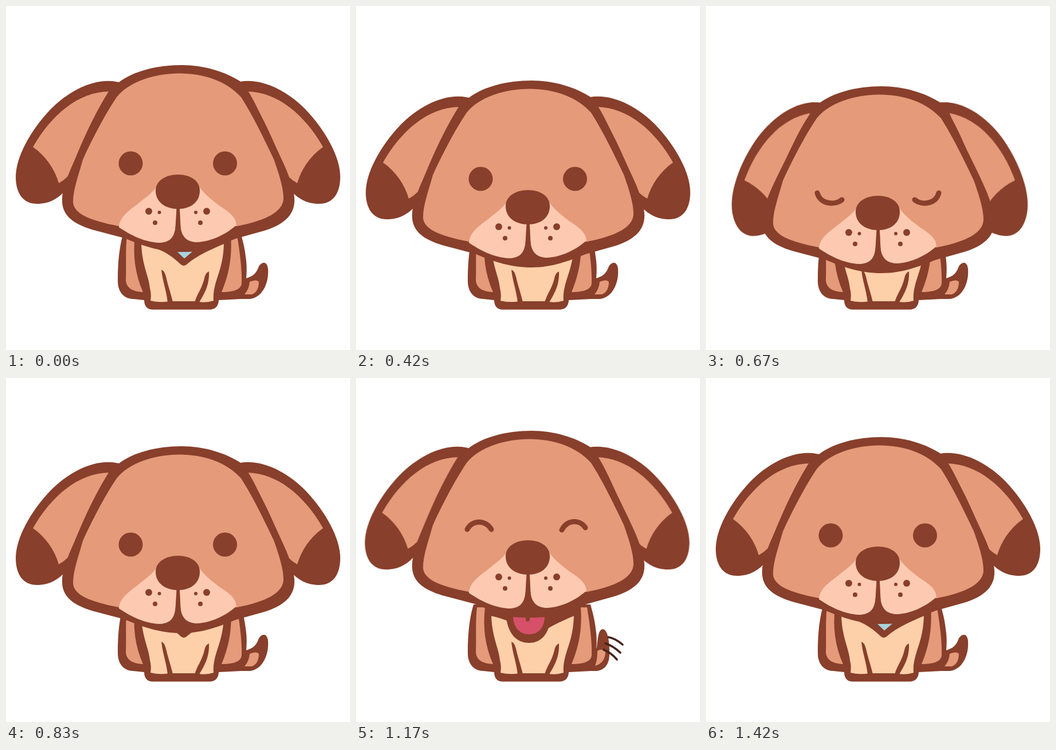
An HTML page that plays this animation: 600 px wide and 600 px high, repeating every 1.5 s.

```html
<!DOCTYPE html>
<html lang="en">
<head>
<meta charset="utf-8">
<title>Nodding puppy</title>
<style>
  html, body { margin: 0; width: 100%; height: 100%; overflow: hidden; background: #fff; }
  svg { display: block; width: 100vw; height: 100vh; }

  .dark { fill: #883f2b; }
  .fur { fill: #e59a79; }
  .belly { fill: #fdd0a9; }
  .muzzle { fill: #fdcab1; }
  .line { fill: none; stroke: #883f2b; stroke-width: 9; stroke-linecap: round; }
  .whisk { fill: none; stroke: #47231a; stroke-width: 3.6; stroke-linecap: round; }

  .head, .ear, .awake, .asleep, .joy, .rest, .wag { animation: 1500ms step-end infinite; }
  .head { animation-name: nod; }
  .ear { animation-name: tuck; transform-origin: 185px 135px; }
  .left { --in: 0px; --sway: -1.5px; }
  .right { --in: -6px; --sway: 1.5px; }
  .awake { animation-name: awake; }
  .asleep { animation-name: asleep; }
  .joy { animation-name: joy; }
  .rest { animation-name: rest; }
  .wag { animation-name: wag; }

  @keyframes nod {
    0% { transform: none; }
    22% { transform: translateY(11px); }
    28% { transform: translateY(27px); }
    33.33% { transform: translateY(34px); }
    38.66% { transform: translateY(37px); }
    50% { transform: translateY(30px); }
    55.33% { transform: translateY(16px); }
    61.33% { transform: translateY(3px); }
    66.66% { transform: translateY(-7px); }
    72% { transform: translateY(-11px); }
    88.66% { transform: translateY(-7px); }
    94.66%, 100% { transform: none; }
  }
  @keyframes tuck {
    0% { transform: none; }
    33.33% { transform: translateX(calc(var(--in) / 2)) rotate(-5deg); }
    38.66% { transform: translateX(var(--in)) rotate(-9.4deg); }
    50% { transform: translateX(calc(var(--in) / 2)) rotate(-5deg); }
    55.33% { transform: none; }
    66.66% { transform: translateX(var(--sway)); }
    94.66%, 100% { transform: none; }
  }
  @keyframes awake {
    0%, 55.33%, 94.66%, 100% { opacity: 1; }
    33.33%, 66.66% { opacity: 0; }
  }
  @keyframes asleep {
    0%, 55.33%, 100% { opacity: 0; }
    33.33% { opacity: 1; }
  }
  @keyframes joy {
    0%, 94.66%, 100% { opacity: 0; }
    66.66% { opacity: 1; }
  }
  @keyframes rest {
    0%, 72%, 83.33%, 94.66%, 100% { opacity: 1; }
    66.66%, 78%, 88.66% { opacity: 0; }
  }
  @keyframes wag {
    0%, 72%, 83.33%, 94.66%, 100% { opacity: 0; }
    66.66%, 78%, 88.66% { opacity: 1; }
  }
</style>
</head>
<body>
<svg viewBox="0 0 600 600">
  <defs>
    <g id="ear">
      <path class="dark" d="M208 137C168 119 115 142 77 181C42 218 17 264 17 298C17 327 30 345 54 345C76 345 94 335 107 317L165 235Z"/>
      <path class="fur" d="M179 149C126 150 79 190 47 246C70 262 85 285 92 309Q101 304 108 297C126 254 146 202 179 149Z"/>
    </g>
  </defs>

  <g class="rest">
    <path class="dark" d="M405 511H425C446 509 459 485 457 458C455 444 446 446 441 454C436 468 430 472 415 476Z"/>
    <path class="fur" d="M425 481Q437 476 441 481Q441 498 429 503H416Q424 494 425 481Z"/>
  </g>
  <g class="wag">
    <path class="dark" d="M405 511H420C436 509 443 496 442 478C442 455 438 438 430 438C422 440 422 455 420 470L410 478Z"/>
    <path class="fur" d="M421 476Q429 471 435 477Q435 497 417 502Q421 492 421 476Z"/>
    <path class="whisk" d="M440 452Q452 454 465 465M435 463Q448 467 461 479M432 474Q445 479 455 491"/>
  </g>

  <path class="dark" d="M205 395C199 415 195 440 195 480C195 500 207 511 222 511L241 513C241 524 247 529.500 256 529.500H355C365 529.500 371 523 371 513L410 511C419 495 422 460 418 437C416 420 413 410 409 395Z"/>
  <path class="fur" d="M211 400H225C221 435 225 467 239 499C222 498 210 493 209 478C210 450 208 425 211 400Z"/>
  <path class="fur" d="M392 400H403C408 430 412 462 411 484C410 494 398 499 376 499C388 470 395 440 392 400Z"/>
  <path class="belly" d="M236 410C236 450 249 470 251 492Q254 504 252 514Q268 518 285 515L332 515Q346 519 362 514Q361 502 364 490C369 468 380 450 380 410Z"/>
  <path class="dark" d="M271 460Q276 461 279 472C283 490 288 502 291 517H282C280 497 273 480 271 460Z"/>
  <path class="dark" d="M354 463Q348 465 346 475C342 493 333 502 329 517H337C347 500 355 486 354 463Z"/>
  <path class="dark" d="M236 415C258 420 282 428 304 450Q310 456 316 450C332 436 354 426 380 415V400H236Z"/>
  <path fill="#a8d2dd" d="M299 429L325 428.500L311 440.500Z"/>

  <g class="head">
    <g class="ear left"><use href="#ear"/></g>
    <g transform="matrix(-1 0 0 1 600 0)"><g class="ear right"><use href="#ear"/></g></g>

    <path class="dark" d="M306 103C262 103 222 114 197 133C172 158 156 196 143 222C130 250 99 305 98 335C96 366 118 380 150 390L207 405C240 419 270 429 306 429C342 429 370 418 400 406L450 392C482 382 505 366 503 335C502 305 472 250 459 222C446 196 432 158 411 133C382 114 345 103 306 103Z"/>
    <path class="fur" d="M302 117.500C262 117.500 215 131 193 159C172 190 149 235 134 268C126 297 117 320 117 342C118 362 145 374 197 384H403C455 374 484 358 484 335C484 315 474 287 467 267C451 233 430 190 410 159C385 131 345 117.500 302 117.500Z"/>
    <path class="muzzle" d="M265 312C256 326 243 334 230 345C213 358 198 368 197 386C215 398 240 412 268 413C290 412 295 399 296 380L298 345Z"/>
    <path class="muzzle" d="M335 312C344 327 359 338 373 349C389 359 401 368 402 382C385 397 360 411 332 412C312 411 305 399 304 380L302.500 345Z"/>
    <path class="dark" d="M298 345H302.500L305 395H295Z"/>
    <path class="dark" d="M300 294C322 294 338 305 338 322C338 342 322 354 300 354C278 354 261 342 261 322C261 305 278 294 300 294Z"/>

    <g class="dark">
      <circle cx="249" cy="358" r="6"/><circle cx="267.5" cy="360" r="3"/><circle cx="260" cy="378" r="4"/>
      <circle cx="350" cy="358" r="6"/><circle cx="331" cy="360" r="3"/><circle cx="339" cy="378" r="4"/>
    </g>

    <g class="awake dark">
      <circle cx="217.5" cy="274.5" r="21"/>
      <circle cx="382" cy="274.5" r="21"/>
    </g>
    <path class="asleep line" d="M194 289C199 309 225 311 237 301M364 301C376 311 401 309 406 289"/>
    <g class="joy">
      <path class="line" d="M194 275C203 258 226 258 236 275M359 276C368 258 390 257 400 272"/>
      <path class="dark" d="M261 422C264 455 278 473 302 473C325 473 338 455 341 422Z"/>
      <path fill="#d65069" d="M274 428Q301 430 329 428C328 448 318 458 301 458C286 458 275 446 274 428Z"/>
      <path class="dark" d="M296 426H303V434Q299.500 438 296 434Z"/>
    </g>
  </g>
</svg>
</body>
</html>
```
